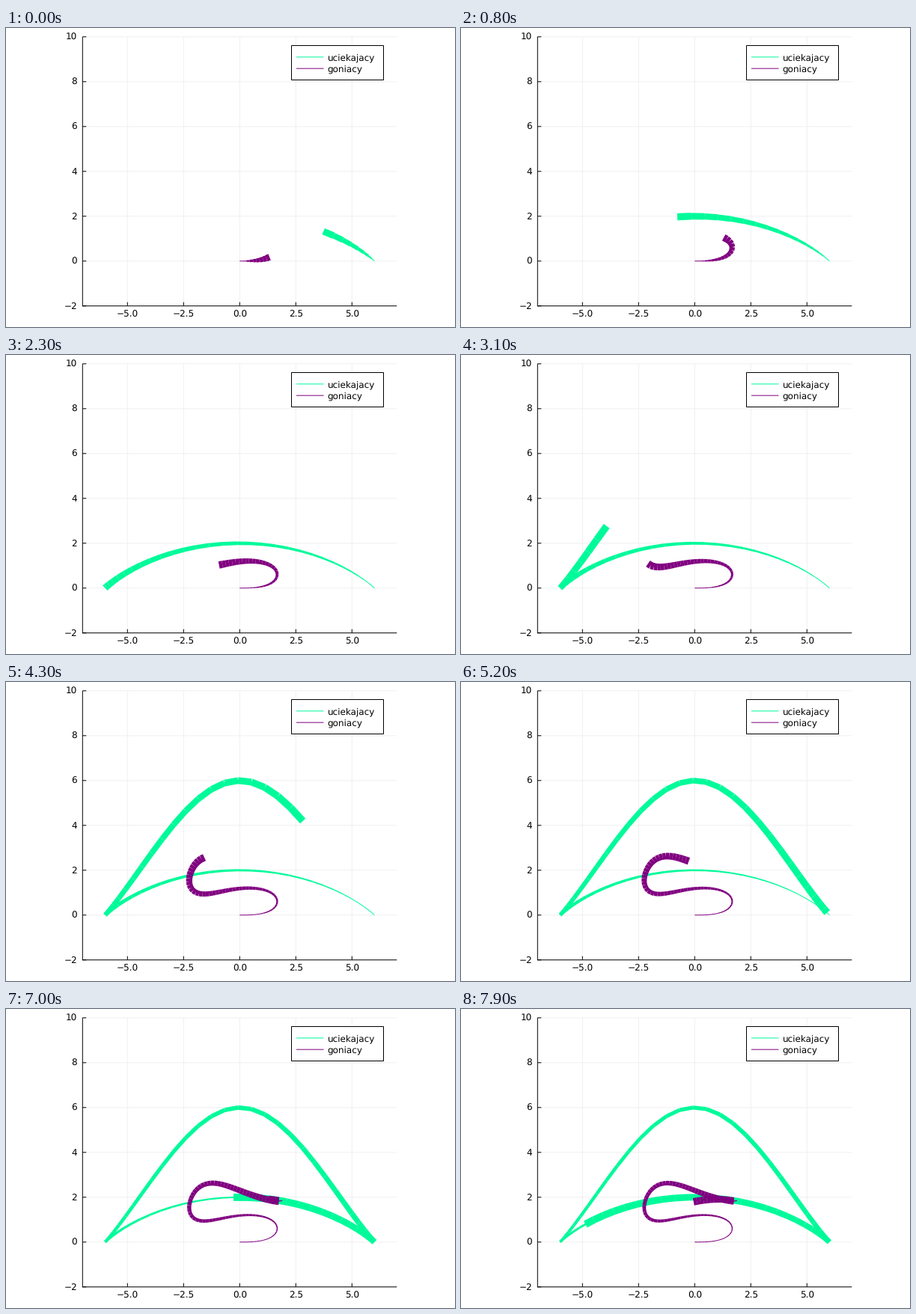
A matplotlib script that plays this animation: 600x400 px, repeating every 8 s.

```python
import numpy as np
import matplotlib.pyplot as plt
from matplotlib.animation import FuncAnimation
from matplotlib.collections import LineCollection
from matplotlib.patches import Rectangle

# keep sub-pixel line positions and unhinted glyphs
plt.rcParams.update({"path.snap": False, "text.hinting": "none"})

W, H, DPI = 600, 400, 100
PT = 72 / DPI                      # points per pixel
FRAMES, INTERVAL = 80, 100
DT, SPEED, FIRST = 0.1, 1.5, 9     # steps already taken when the loop starts
GREEN, PURPLE = "#00fa9a", "#800080"
FONT = dict(family="DejaVu Sans", size=12 * PT, color="black")


def px(x):
    return 312.3 + 30 * np.asarray(x)


def py(y):
    return 311.8 - 30 * np.asarray(y)


def runner(t):
    """Bicorn curve."""
    s, c = np.sin(t), np.cos(t)
    return np.array([6 * c, 6 * s**2 * (2 - s) / (3 + c**2)])


def chase(n, sub=20):
    """Pure pursuit of the runner at constant speed, by RK4."""
    def vel(t, p):
        d = runner(t) - p
        return SPEED * d / max(np.hypot(*d), 1e-9)

    h, p, path = DT / sub, np.zeros(2), [np.zeros(2)]
    for i in range(n * sub):
        t = i * h
        a = vel(t, p)
        b = vel(t + h / 2, p + h / 2 * a)
        c = vel(t + h / 2, p + h / 2 * b)
        d = vel(t + h, p + h * c)
        p = p + h / 6 * (a + 2 * b + 2 * c + d)
        if (i + 1) % sub == 0:
            path.append(p)
    return np.array(path)


def segments(path):
    q = np.column_stack([px(path[:, 0]), py(path[:, 1])])
    return np.stack([q[:-1], q[1:]], axis=1)


steps = FIRST + FRAMES - 1
run_segs = segments(runner(DT * np.arange(steps + 1)).T)
chase_segs = segments(chase(steps))

fig = plt.figure(figsize=(W / DPI, H / DPI), dpi=DPI, facecolor="white")
ax = fig.add_axes([0, 0, 1, 1])
ax.set_xlim(0, W)
ax.set_ylim(H, 0)
ax.axis("off")


def line(xs, ys, color="black", width=1, z=1):
    ax.plot(xs, ys, color=color, lw=width * PT, zorder=z,
            solid_capstyle="butt")


left, right, top, bottom = px(-7), px(7), py(10), py(-2)

for v in (-5, -2.5, 0, 2.5, 5):
    x = px(v)
    line([x, x], [top, bottom], "#f0f0f0")
    line([x, x], [bottom, bottom - 5], z=2)
    ax.text(x, 387.3, f"{v:.1f}".replace("-", "\u2212"), ha="center", **FONT)

for v in range(-2, 11, 2):
    y = py(v)
    line([left, right], [y, y], "#f0f0f0")
    line([left, left + 5], [y, y], z=2)
    ax.text(95, y + 4.4, str(v).replace("-", "\u2212"), ha="right", **FONT)

line([left, left], [top, bottom + 0.5], z=2)
line([left, right], [bottom, bottom], z=2)

trails = []
for color, z in ((GREEN, 3), (PURPLE, 4)):
    trail = LineCollection([], colors=color, capstyle="butt", zorder=z)
    ax.add_collection(trail, autolim=False)
    trails.append(trail)

# legend: two rows at thirds of the box
box_top, box_h = 23.5, 46
ax.add_patch(Rectangle((381.5, box_top), 123, box_h, fc="white", ec="black",
                       lw=PT, zorder=5))
for row, (name, color) in enumerate((("uciekajacy", GREEN),
                                     ("goniacy", PURPLE)), 1):
    y = box_top + row * box_h / 3
    line([388, 424.5], [y, y], color, z=6)
    ax.text(429.5, y + 4.4, name, zorder=6, **FONT)


def update(i):
    n = FIRST + i
    widths = np.maximum(np.linspace(0, 10, n + 1)[:-1], 1) * PT
    for trail, segs in zip(trails, (run_segs, chase_segs)):
        trail.set_segments(segs[:n])
        trail.set_linewidths(widths)
    return trails


anim = FuncAnimation(fig, update, frames=FRAMES, interval=INTERVAL,
                     init_func=lambda: update(0), repeat=True, repeat_delay=0)
plt.show()
```
